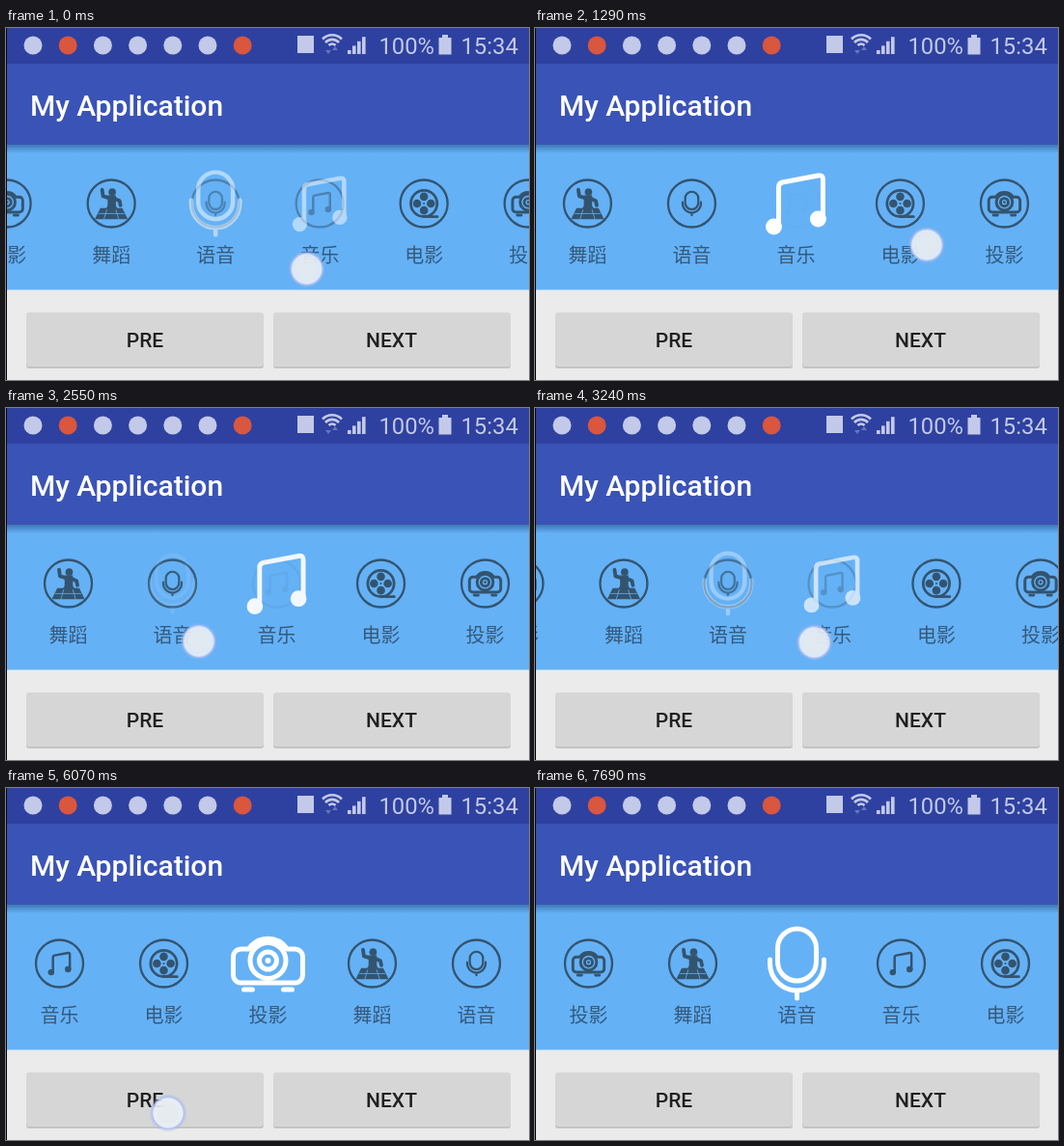
Animation of 542x365 px, one loop 8000 ms. Source, as an HTML page:

```html
<!DOCTYPE html>
<html lang="zh">
<head>
<meta charset="utf-8">
<style>
html, body { margin: 0; width: 100%; height: 100%; overflow: hidden; background: #ebebeb; }
svg { display: block; width: 100vw; height: 100vh; font-family: Roboto, sans-serif; }
.status { fill: #c3c9e8; font-size: 23.8px; }
.title { fill: #fff; font-size: 30px; font-weight: 500; }
.button text { fill: #202020; font-size: 21px; font-weight: 500; text-anchor: middle; }
.label { fill: #345a7c; font: 20px "Noto Sans CJK SC", "Noto Sans CJK", sans-serif; text-anchor: middle; }
.icon { fill: none; stroke: currentColor; stroke-linecap: round; stroke-linejoin: round; }
.dark { color: #33546f; stroke-width: 6.5; }
.light { color: #fff; stroke-width: 5; }
.solid, .dark .hole { fill: currentColor; }
.solid { stroke: none; }
</style>
</head>
<body>
<svg viewBox="0 0 542 365" preserveAspectRatio="none">
  <defs>
    <linearGradient id="shade" x2="0" y2="1">
      <stop stop-color="#1b4a80" stop-opacity=".55"/>
      <stop offset="1" stop-color="#1b4a80" stop-opacity="0"/>
    </linearGradient>
    <clipPath id="buttons">
      <rect x="21" y="295" width="246" height="56" rx="3"/>
      <rect x="277" y="295" width="246" height="56" rx="3"/>
    </clipPath>
  </defs>

  <rect width="542" height="365" fill="#ebebeb"/>
  <rect y="121" width="542" height="150.5" fill="#65b1f6"/>
  <rect y="121" width="542" height="9" fill="url(#shade)"/>
  <g id="row"></g>

  <rect y="37" width="542" height="84" fill="#3a53b6"/>
  <rect width="542" height="37" fill="#2e41a0"/>
  <text class="title" x="25" y="90.5">My Application</text>

  <g class="status">
    <g id="notices"></g>
    <rect x="302" y="8" width="17" height="18"/>
    <path d="M328 11.5a14 14 0 0 1 20 0M331 15a9.5 9.5 0 0 1 14 0M334.5 18a5 5 0 0 1 7 0"
      fill="none" stroke="#c3c9e8" stroke-width="2.6"/>
    <path d="M331 23h6l-3 4zM338 23h6l-3-4z" fill="#6977bd"/>
    <g id="bars"></g>
    <path d="M452 10v-3h6v3h3.5v17.5h-13v-17.5z"/>
    <text x="386.5" y="27">100%</text>
    <text x="471.5" y="27">15:34</text>
  </g>

  <g class="button">
    <rect x="21" y="297" width="246" height="56" rx="3" fill="#c3c3c3"/>
    <rect x="277" y="297" width="246" height="56" rx="3" fill="#c3c3c3"/>
    <g clip-path="url(#buttons)">
      <rect y="290" width="542" height="70" fill="#d6d6d6"/>
      <circle id="ripple"/>
    </g>
    <text x="144" y="331">PRE</text>
    <text x="399.5" y="331">NEXT</text>
  </g>

  <g id="touch">
    <circle r="19" fill="#8fb2f0" opacity=".3"/>
    <circle r="16.5" fill="#f0f3f8" stroke="#b3c2ee" stroke-width="1.6" opacity=".86"/>
    <circle r="11" fill="#e3e9ec" opacity=".7"/>
  </g>
  <rect width="1" height="365" fill="#05070c"/>
</svg>
<script>
const $ = id => document.getElementById(id);
const clamp = (v, lo = 0, hi = 1) => Math.min(hi, Math.max(lo, v));
const mix = (a, b, u) => a + (b - a) * u;
const repeat = (n, draw) => Array.from({ length: n }, (_, i) => draw(i)).join('');

const LOOP = 8000, GAP = 108, MID = 271.5;

// name, scale of the small version, shape around its centre
const ITEMS = [
  ['舞蹈', .95, `<circle class="solid" cx="1" cy="-12.5" r="4"/>
    <path d="M-2-6L-9-8L-10-15M2-6L9-3L10 2M-1 2L-6 9M2 2L7 9" stroke-width="4"/>
    <path class="solid" d="M-4-9H5L5 5H-4zM-12 5H12L18 17H-18z"/>
    <path d="M-14 11H14M-5 7L-8 17M5 7L8 17" stroke="#65b1f6" stroke-width=".8"/>`],
  ['语音', .34, `<rect x="-20" y="-36" width="40" height="54" rx="20"/>
    <path d="M-28-4V0A28 28 0 0 0 28 0V-4M0 28V36"/>`],
  ['音乐', .38, `<path d="M-18 24V-17Q-18-21-14-22L23-29Q28-30 28-25V16"/>
    <circle class="solid" cx="-23" cy="24" r="8.5"/><circle class="solid" cx="23" cy="16" r="8.5"/>`],
  ['电影', .42, `<circle r="32.5"/><path d="M0 32.5H33"/><circle class="solid" r="2.5"/>` +
    repeat(4, i => `<circle class="hole" cx="17" r="7" transform="rotate(${i * 90})"/>`)],
  ['投影', .45, `<path d="M-20-15H-28A8 8 0 0 0-36-7V12A8 8 0 0 0-28 20H28A8 8 0 0 0 36 12V-7A8 8 0 0 0 28-15H20A24 24 0 0 0-20-15z"/>
    <circle cy="-3" r="18.5"/><circle cy="-3" r="9"/><circle class="solid" cy="-3" r="3"/>
    <path d="M-25 27H-16M16 27H25"/>`],
];

const swipe = (t, x, y, dir) => ({ t, x, y, dir, hold: 290 });
const tap = (t, x, y, dir) => ({ t, x, y, dir, hold: 150, tap: true });
const GESTURES = [
  swipe(-219, 366, 250, 1), swipe(1265, 407, 225, 1),
  swipe(1965, 187, 241, -1), swipe(2470, 190, 242, -1), swipe(2967, 361, 243, 1),
  ...[0, 1].map(i => tap(4220 + 930 * i, 424, 324, 1)),
  ...[0, 1, 2].map(i => tap(6040 + 340 * i, 168, 337, -1)),
];
const FIRST = 1;

// part of one page turned by a gesture: a soft fling or a hard jump
function turned(g, t) {
  const age = Math.max(0, t - g.t);
  return g.tap ? +(age >= 270) : 1 - Math.exp(-((age / 263) ** 2));
}

$('notices').innerHTML = repeat(7, i =>
  `<circle cx="${28 + 36.2 * i}" cy="18" r="9.5" fill="${i % 5 == 1 ? '#d9563f' : '#c3c9e8'}"/>`);
$('bars').innerHTML = repeat(4, i =>
  `<rect x="${354 + 5 * i}" y="${23 - 4.6 * i}" width="3.6" height="${4 + 4.6 * i}"/>`);

const cells = [];
for (let j = -2; j < 8; j++) {
  const [name, small, shape] = ITEMS[(j + 5) % 5];
  const g = document.createElementNS('http://www.w3.org/2000/svg', 'g');
  g.setAttribute('transform', `translate(${j * GAP} 182)`);
  g.innerHTML = `<g class="icon dark"><circle r="24.5" stroke-width="2.3"/>
    <g transform="scale(${small})">${shape}</g></g>
    <g class="icon light">${shape}</g><text class="label" y="61">${name}</text>`;
  $('row').append(g);
  cells.push({ j, dark: g.children[0], light: g.children[1] });
}

function set(el, attrs) {
  for (const name in attrs) el.setAttribute(name, attrs[name]);
}

function drawRow(t) {
  const pos = GESTURES.reduce((sum, g) => sum + g.dir * turned(g, t), FIRST);
  set($('row'), { transform: `translate(${MID - pos * GAP} 0)` });
  for (const { j, dark, light } of cells) {
    const d = Math.min(1, Math.abs(j - pos));
    set(dark, { opacity: d });
    set(light, { opacity: 1 - d, transform: `scale(${1 - .2 * d})` });
  }
}

function drawTouch(g, t) {
  const x = g.tap ? g.x : g.x - g.dir * GAP * turned(g, t);
  set($('touch'), {
    transform: `translate(${x} ${g.y})`,
    opacity: clamp(1 - (t - g.t - g.hold) / 150),
  });
}

function drawRipple(g, t) {
  const age = t - g.t, grow = clamp((age - 100) / 230, 0, 1.2), u = Math.min(grow, 1);
  set($('ripple'), {
    cx: mix(g.x, g.dir > 0 ? 400 : 144, u),
    cy: mix(g.y, 323, u),
    r: grow * 110,
    opacity: g.tap ? .09 * clamp((560 - age) / 280) : 0,
  });
}

function frame(now) {
  const t = now % LOOP, latest = GESTURES.findLast(g => g.t <= t);
  drawRow(t);
  drawTouch(latest, t);
  drawRipple(latest, t);
  requestAnimationFrame(frame);
}
requestAnimationFrame(frame);
</script>
</body>
</html>
```
